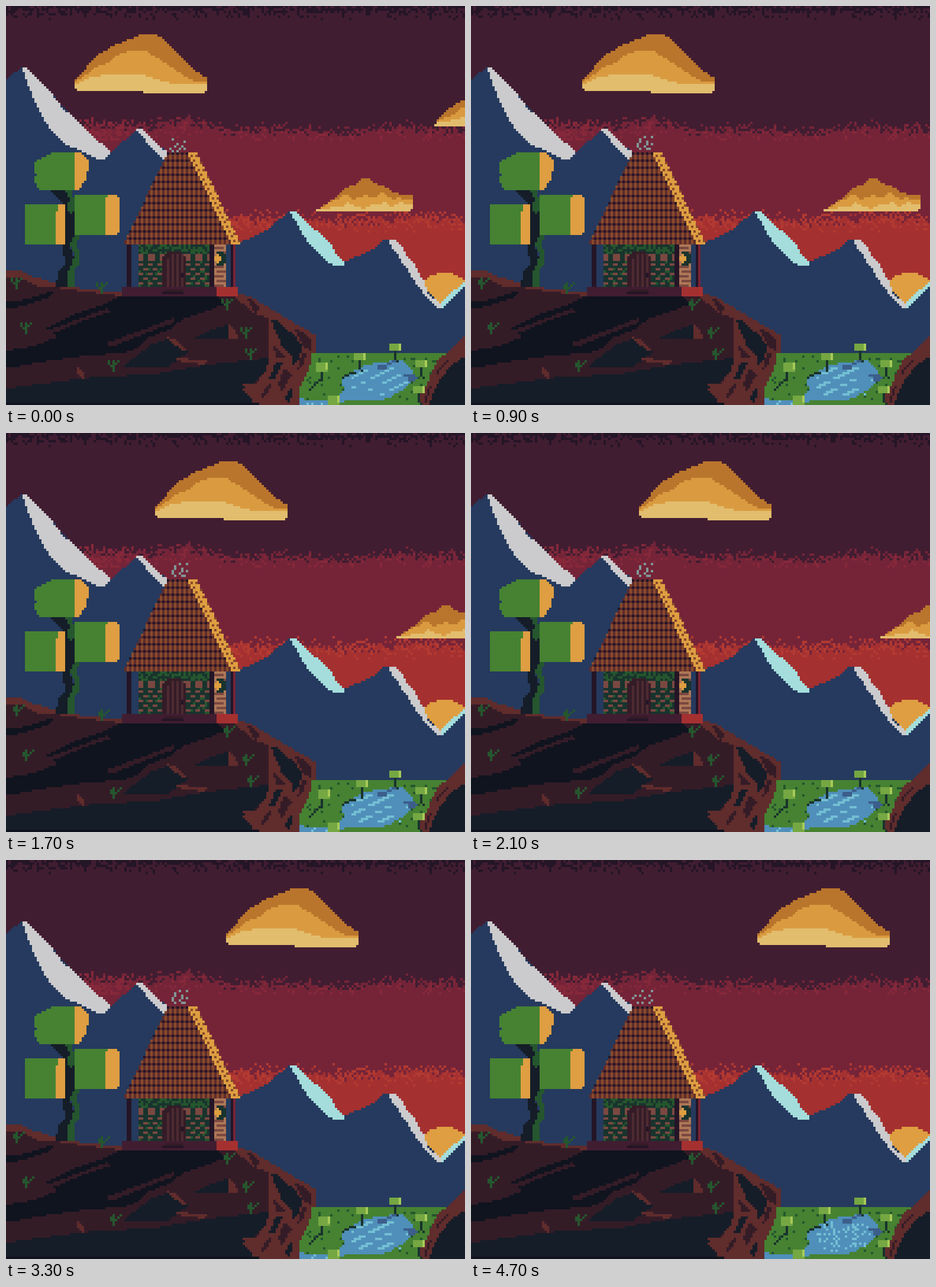
An HTML page with a canvas for the animation above (4800 ms loop, 776 by 676 pixels).

```html
<!DOCTYPE html>
<html lang="en">
<head>
<meta charset="utf-8">
<title>Hut at dusk</title>
<style>
html, body { margin: 0; width: 100%; height: 100%; overflow: hidden; background: #411d31; }
canvas { display: block; width: 776px; height: 676px; image-rendering: pixelated; }
</style>
</head>
<body>
<canvas id="stage" width="194" height="169"></canvas>
<script>
const W = 194, H = 169, CELL = 4;
const stage = document.getElementById('stage').getContext('2d');
const back = document.createElement('canvas');
back.width = W;
back.height = H;
let g = back.getContext('2d');

const C = {
  plum: '#411d31', night: '#241527', wine: '#752438', red: '#a53030',
  blue: '#253a5e', snow: '#cbcbcd', ice: '#a4dddb', sun: '#de9e41',
  rust: '#602c2c', earth: '#341c27', coal: '#10141f', slate: '#151d28',
  leaf: '#468232', moss: '#25562e', pine: '#19332d', lime: '#75a743', pale: '#a8ca58',
  water: '#4f8fba', glint: '#73bed3', deep: '#3c5e8b',
  tile: '#884b2b', brick: '#7a4841', clay: '#ad7757', door: '#4d2b32', smoke: '#819796'
};
const CLOUD = ['#ba752c', '#da9b40', '#e2bd6e'];

function noise(x, y) {
  const s = Math.sin(x * 12.9898 + y * 78.233) * 43758.5453;
  return s - Math.floor(s);
}
function dot(color, x, y, w = 1, h = 1) {
  g.fillStyle = color;
  g.fillRect(x, y, w, h);
}
function box(color, x, y, w, h) {
  dot(color, x / CELL, y / CELL, w / CELL, h / CELL);
}
// Hard-edged polygon, points in stage pixels
function poly(color, p, dx = 0) {
  g.fillStyle = color;
  for (let row = 0; row < H; row++) {
    const y = row * CELL + 2, hits = [];
    for (let i = 0, j = p.length - 2; i < p.length; j = i, i += 2) {
      const y1 = p[j + 1], y2 = p[i + 1];
      if ((y1 > y) !== (y2 > y)) hits.push(p[j] + (y - y1) / (y2 - y1) * (p[i] - p[j]));
    }
    hits.sort((a, b) => a - b);
    for (let k = 0; k + 1 < hits.length; k += 2) {
      const a = Math.ceil((hits[k] + dx - 2) / CELL), b = Math.ceil((hits[k + 1] + dx - 2) / CELL);
      if (b > a) g.fillRect(a, row, b - a, 1);
    }
  }
}
function line(color, x1, y1, x2, y2) {
  const n = Math.max(Math.abs(x2 - x1), Math.abs(y2 - y1)) / CELL;
  for (let i = 0; i <= n; i++) {
    const k = n ? i / n : 0;
    dot(color, Math.floor((x1 + (x2 - x1) * k) / CELL), Math.floor((y1 + (y2 - y1) * k) / CELL));
  }
}

function sky() {
  for (let y = 0; y < 130; y++) for (let x = 0; x < W; x++) {
    const n = noise(x, y), m = noise(x + 300, y + 70);
    const wave = Math.sin(x / 7) + Math.sin(x / 17);
    const upper = (x < 85 ? 46.5 : 48.5) + wave * 0.7;
    const lower = 87 + wave * 0.6;
    let c = C.plum;
    if (y < 6 && n < 0.75 - y * 0.14) c = C.night;
    if (n < (y - upper) / 6) c = C.wine;
    if (c === C.wine && y < 57 && m < (x < 52 ? 0.5 : 0.14)) c = '#86283a';
    if (y > 80 && n < (y - lower) / 6) c = C.red;
    if (y > 85 && y < 96 && m < (x < 110 ? 0.5 : 0.32) * (1 - Math.abs(y - 91) / 6)) c = '#b23a32';
    dot(c, x, y);
  }
}

function mountains() {
  g.fillStyle = C.sun;
  for (let y = 452; y < 512; y += CELL) {
    const k = (490 - y - 2) / 38, r = 44 * Math.sqrt(Math.max(0, 1 - k * k));
    const a = Math.round((741 - r) / CELL);
    g.fillRect(a, y / CELL, Math.round((741 + r) / CELL) - a, 1);
  }
  poly(C.blue, [0, 124, 28, 104, 36, 104, 68, 136, 104, 180, 128, 204, 164, 238, 176, 250,
    220, 210, 228, 210, 276, 250, 330, 404, 392, 402, 416, 392, 440, 380, 464, 360, 480, 348, 488, 350,
    540, 396, 560, 424, 572, 434, 620, 412, 640, 396, 656, 396, 700, 456, 712, 484, 736, 506, 776, 468,
    776, 590, 0, 590]);
  poly(C.snow, [28, 104, 36, 104, 44, 112, 68, 136, 80, 152, 92, 168, 104, 180, 112, 184, 128, 204,
    140, 214, 152, 228, 164, 235, 177, 246, 168, 260, 156, 260, 140, 252, 120, 242, 100, 234, 88, 220,
    72, 204, 60, 184, 48, 160, 40, 140, 32, 120]);
  poly(C.snow, [220, 208, 228, 208, 244, 222, 260, 238, 278, 250, 272, 260, 264, 258, 248, 244, 236, 228, 224, 214]);
  poly(C.ice, [480, 348, 488, 348, 500, 357, 512, 368, 524, 380, 540, 394, 552, 408, 560, 424, 572, 432,
    572, 438, 556, 441, 540, 432, 524, 412, 508, 396, 500, 384, 492, 368]);
  poly(C.snow, [648, 396, 658, 396, 668, 406, 676, 420, 692, 440, 700, 456, 708, 468, 712, 484, 724, 496,
    736, 504, 736, 512, 728, 510, 716, 500, 704, 484, 692, 468, 680, 448, 668, 432, 660, 416, 652, 408]);
  poly(C.ice, [736, 504, 748, 492, 760, 480, 776, 466, 776, 476, 764, 486, 756, 492, 744, 506, 736, 512]);
}

function field() {
  box(C.leaf, 496, 588, 280, 88);
  for (let y = 148; y < 168; y++) for (let x = 124; x < 190; x++)
    if (noise(x, y) < 0.065) dot(C.moss, x, y);
  poly(C.water, [566, 632, 576, 624, 588, 618, 608, 608, 632, 604, 668, 600, 684, 612, 692, 628, 684, 640,
    668, 652, 648, 664, 620, 670, 576, 668, 560, 676, 496, 676, 496, 664, 512, 668, 536, 668, 564, 660, 572, 648]);
  box(C.deep, 628, 608, 16, 8);
  line(C.deep, 640, 608, 656, 600);
  line(C.deep, 672, 624, 692, 628);
  box(C.deep, 680, 628, 12, 8);
  poly(C.rust, [776, 558, 764, 570, 752, 582, 740, 592, 728, 604, 720, 620, 712, 640, 700, 656, 700, 676, 776, 676]);
  poly(C.slate, [776, 594, 756, 606, 744, 620, 732, 636, 724, 652, 716, 676, 776, 676]);
  line(C.earth, 744, 600, 728, 620);
  line(C.earth, 716, 644, 708, 668);
}

function hill() {
  poly(C.rust, [0, 450, 28, 450, 44, 458, 68, 464, 96, 474, 140, 480, 196, 486, 388, 490, 400, 488, 420, 496,
    440, 508, 460, 520, 480, 532, 500, 544, 524, 558, 524, 588, 516, 590, 516, 604, 508, 624, 500, 640,
    496, 652, 496, 676, 0, 676]);
  poly(C.earth, [0, 458, 28, 462, 52, 474, 80, 476, 120, 482, 200, 492, 388, 492, 400, 504, 420, 520, 444, 530,
    444, 600, 436, 620, 424, 640, 404, 648, 0, 676]);
  poly(C.coal, [0, 502, 40, 496, 60, 488, 80, 484, 76, 492, 56, 500, 30, 508, 0, 514]);
  poly(C.coal, [196, 490, 356, 492, 372, 504, 352, 512, 300, 530, 276, 548, 236, 564, 224, 580, 196, 588,
    140, 592, 80, 600, 0, 614, 0, 584, 48, 576, 88, 560, 64, 548, 120, 520, 170, 504]);
  poly(C.earth, [64, 552, 108, 536, 172, 512, 176, 518, 124, 536, 68, 560]);
  poly(C.earth, [172, 570, 228, 550, 284, 528, 284, 536, 232, 556, 176, 578]);
  poly(C.slate, [0, 648, 60, 640, 124, 632, 160, 628, 250, 624, 290, 616, 340, 608, 444, 596, 440, 620,
    424, 632, 420, 640, 400, 650, 412, 660, 420, 676, 0, 676]);
  poly(C.slate, [196, 612, 232, 584, 248, 572, 276, 564, 308, 586, 290, 600, 272, 612]);
  poly(C.slate, [312, 566, 340, 552, 376, 540, 378, 566]);
  poly(C.rust, [268, 560, 284, 564, 300, 576, 308, 586, 296, 582, 280, 570]);
  poly(C.rust, [284, 594, 320, 600, 342, 602, 336, 608, 296, 602]);
  poly(C.rust, [376, 540, 388, 548, 392, 562, 376, 564]);
  poly(C.rust, [120, 610, 132, 620, 132, 632, 120, 624]);
  box(C.coal, 0, 672, 432, 4);

  poly(C.rust, [400, 640, 424, 640, 436, 656, 440, 676, 428, 676, 416, 660]);
  const cracks = [
    [448, 532, 460, 532, 472, 548, 488, 556, 500, 576, 496, 600, 484, 612, 484, 592, 468, 580, 460, 560],
    [488, 548, 504, 552, 518, 568, 518, 584, 504, 578],
    [408, 494, 420, 500, 430, 516, 420, 520],
    [456, 604, 468, 604, 460, 620, 452, 634, 444, 634],
    [440, 644, 450, 638, 440, 660, 430, 664],
    [472, 612, 484, 624, 472, 644, 468, 656, 460, 640],
    [476, 656, 486, 644, 480, 672, 472, 668],
    [500, 588, 508, 590, 500, 612, 492, 620],
    [452, 572, 460, 580, 472, 596, 456, 596]
  ];
  cracks.forEach((p, i) => poly(i % 3 ? C.earth : C.slate, p));
}

function tree() {
  poly(C.slate, [76, 312, 104, 312, 116, 330, 116, 388, 108, 404, 116, 430, 108, 452, 108, 476, 84, 476,
    88, 452, 100, 436, 96, 412, 100, 396, 100, 348, 92, 328]);
  poly(C.moss, [100, 312, 112, 314, 116, 330, 116, 348, 108, 352, 104, 340, 108, 328]);
  poly(C.moss, [116, 388, 124, 388, 120, 404, 126, 424, 124, 436, 116, 448, 116, 476, 104, 476, 104, 452,
    112, 436, 116, 420, 108, 404]);
  poly(C.leaf, [80, 248, 116, 248, 116, 312, 60, 312, 52, 304, 48, 292, 52, 288, 48, 280, 48, 268, 56, 260]);
  poly(C.sun, [116, 248, 128, 248, 140, 260, 140, 272, 136, 292, 128, 304, 124, 312, 116, 312]);
  box(C.leaf, 32, 336, 52, 68);
  box(C.sun, 84, 336, 16, 68);
  box(C.leaf, 84, 336, 4, 12);
  box(C.leaf, 116, 320, 52, 68);
  box(C.sun, 168, 320, 24, 68);
  box(C.leaf, 168, 320, 4, 4);
  box(C.blue, 188, 320, 4, 4);
  box(C.blue, 188, 384, 4, 4);
}

function house() {
  box(C.night, 204, 404, 8, 72);
  box(C.pine, 224, 404, 120, 72);
  for (let y = 101; y < 119; y++) for (let x = 56; x < 86; x++) {
    if (y < 105) {
      if (noise(x, y) < 0.45) dot(C.moss, x, y);
    } else if (y < 108) {
      if (x % 5 < 3) dot(C.brick, x, y);
    } else if (y % 2 && (x + (y % 4 > 1 ? 2 : 0)) % 4 < 2) dot(C.brick, x, y);
    else if (noise(x, y) < 0.12) dot(C.moss, x, y);
  }
  poly(C.earth, [264, 480, 264, 428, 272, 416, 296, 416, 304, 428, 304, 480]);
  for (let x = 272; x < 300; x += 8) box(C.door, x, x === 272 ? 428 : 420, 4, 56);
  box(C.night, 296, 452, 4, 8);

  box(C.night, 344, 404, 8, 72);
  box(C.clay, 352, 404, 20, 72);
  for (let y = 408; y < 476; y += 8) box(C.brick, y % 16 ? 352 : 356, y, 16, 4);
  poly(C.pine, [356, 416, 368, 416, 372, 424, 372, 436, 364, 440, 356, 440]);
  box(C.sun, 352, 424, 12, 8);
  box(C.sun, 356, 420, 4, 16);
  box(C.night, 380, 404, 4, 72);
  box(C.wine, 384, 404, 4, 72);

  box(C.plum, 196, 476, 160, 16);
  box(C.red, 356, 476, 36, 16);
  box(C.earth, 268, 480, 32, 4);
  box(C.night, 264, 484, 36, 4);

  for (let y = 62; y < 101; y++) {
    const k = (y - 62) / 38;
    const left = Math.round(68 - 18 * k), right = Math.round(81 + 18 * k);
    for (let x = left; x < right; x++) {
      const seam = y % 3 === 2, odd = x % 2;
      dot(seam ? (odd ? C.rust : C.night) : (odd ? C.tile : C.rust), x, y);
    }
    dot(C.sun, right - 4, y);
    dot(y % 2 ? C.tile : C.sun, right - 3, y);
    dot(C.sun, right - 2, y);
    dot(y % 3 ? C.sun : C.tile, right - 1, y);
  }
}

function cloud(shapes, dx) {
  shapes.forEach((p, i) => poly(CLOUD[i], p, dx));
}
const bigCloud = [
  [116, 124, 124, 118, 136, 104, 144, 96, 148, 88, 160, 80, 172, 76, 180, 68, 200, 60, 220, 52, 228, 48,
    252, 48, 268, 56, 276, 64, 284, 76, 304, 92, 320, 110, 340, 122, 340, 136, 336, 148, 232, 148,
    232, 144, 124, 144, 116, 136],
  [116, 130, 136, 116, 152, 104, 172, 96, 188, 84, 208, 76, 236, 76, 248, 84, 260, 88, 268, 96, 280, 104,
    292, 112, 304, 120, 320, 128, 340, 130, 340, 136, 336, 148, 232, 148, 232, 144, 124, 144, 116, 136],
  [116, 134, 124, 130, 140, 122, 160, 118, 176, 116, 232, 116, 244, 120, 256, 124, 268, 128, 284, 132,
    310, 134, 340, 132, 340, 140, 336, 148, 232, 148, 232, 144, 124, 144, 116, 138]
];
const lowCloud = [
  [524, 348, 532, 342, 552, 328, 568, 316, 576, 308, 588, 304, 596, 300, 604, 292, 616, 292, 624, 300,
    636, 304, 648, 308, 656, 316, 672, 320, 688, 322, 688, 340, 684, 348],
  [524, 348, 536, 340, 552, 330, 568, 324, 572, 318, 580, 320, 588, 328, 600, 324, 608, 318, 620, 326,
    628, 322, 636, 316, 644, 322, 656, 328, 664, 324, 676, 328, 688, 326, 688, 340, 684, 348],
  [524, 348, 524, 345, 548, 342, 572, 338, 578, 333, 590, 340, 608, 343, 618, 336, 632, 336, 640, 331,
    652, 340, 668, 332, 680, 336, 688, 334, 688, 340, 684, 348]
];
const edgeCloud = [
  [724, 204, 728, 196, 736, 188, 752, 172, 764, 164, 776, 158, 820, 150, 820, 204],
  [724, 204, 728, 198, 740, 190, 756, 184, 772, 172, 820, 164, 820, 204],
  [724, 204, 728, 198, 740, 196, 764, 192, 776, 186, 820, 180, 820, 204]
];

// Smoke puffs as x, y cell pairs for the four poses
const puffs = [
  [70, 56, 75, 57, 72, 58, 71, 59, 74, 59, 69, 60, 73, 60, 75, 60, 70, 61, 72, 61],
  [73, 55, 76, 55, 71, 56, 74, 57, 74, 58, 76, 58, 70, 58, 70, 59, 71, 60, 73, 59, 75, 60, 71, 57, 74, 60],
  [72, 55, 75, 55, 70, 56, 73, 57, 76, 57, 69, 58, 74, 58, 71, 59, 75, 60, 72, 60],
  [72, 55, 76, 55, 69, 57, 71, 57, 75, 57, 68, 58, 73, 58, 72, 60, 70, 60, 75, 60, 76, 59]
];
const tufts = [8, 460, 152, 468, 24, 536, 396, 544, 404, 580, 172, 600, 364, 496];

function tuft(x, y, lean) {
  const d = lean * CELL;
  line(C.moss, x + d, y + 4, x + 8, y + 12);
  line(C.moss, x + 16 + d, y, x + 8, y + 12);
  line(C.moss, x + 8, y, x + 8, y + 16);
  if (!lean) box(C.moss, x, y, 4, 4);
}
function flower(x, y, shift, stem) {
  const d = shift * CELL;
  line(C.pine, x + 8 + d, y + 12, x + 8 + stem, y + 28);
  box(C.lime, x + d, y, 20, stem > 0 ? 12 : 16);
  box(C.pale, x + 16 + d, y, 4, 12);
}
function ripples(pose) {
  for (let y = 153; y < 166; y++) {
    const k = (y - 159) / 7, half = 13 * Math.sqrt(Math.max(0, 1 - k * k));
    for (let x = Math.ceil(158 - half); x < 158 + half - 1; x++) {
      const lit = pose === 3
        ? noise(x, y + 40) < 0.2
        : (x + 2 * y + pose) % 9 < 2 + pose % 2 && noise(Math.floor((x + 2 * y + pose) / 9), y + pose * 9) < 0.72;
      if (lit) dot(C.glint, x, y);
    }
  }
  for (let x = 126; x < 140; x++) if (noise(x, pose) < 0.28) dot(C.glint, x, 167 + x % 2);
}

sky();
mountains();
field();
hill();
tree();
house();

function draw(now) {
  const step = Math.floor(now % 4800 / 100), pose = step % 4;
  const dx = 8 * (step < 24 ? step : step - 1);
  g = stage;
  g.drawImage(back, 0, 0);
  cloud(bigCloud, dx);
  cloud(lowCloud, dx);
  cloud(edgeCloud, dx);

  for (let i = 0; i < puffs[pose].length; i += 2) dot(C.smoke, puffs[pose][i], puffs[pose][i + 1]);
  for (let i = 0; i < tufts.length; i += 2) tuft(tufts[i], tufts[i + 1], pose ? 1 : 0);

  ripples(pose);
  const sway = pose === 1 || pose === 2 ? 1 : 0;
  line(C.pine, 568, 628, 588, 620);
  line(C.pine, 512, 648, 532, 632);
  flower(648, 572, 0, 4);
  flower(588, 588, sway, 4);
  flower(524, 604, sway, 0);
  flower(692, 600, 0, 4);
  flower(688, 644, 0, 4);
  flower(544, 660, 0, 0);
}

const start = performance.now();
function tick() {
  draw(performance.now() - start);
  requestAnimationFrame(tick);
}
tick();
</script>
</body>
</html>
```
